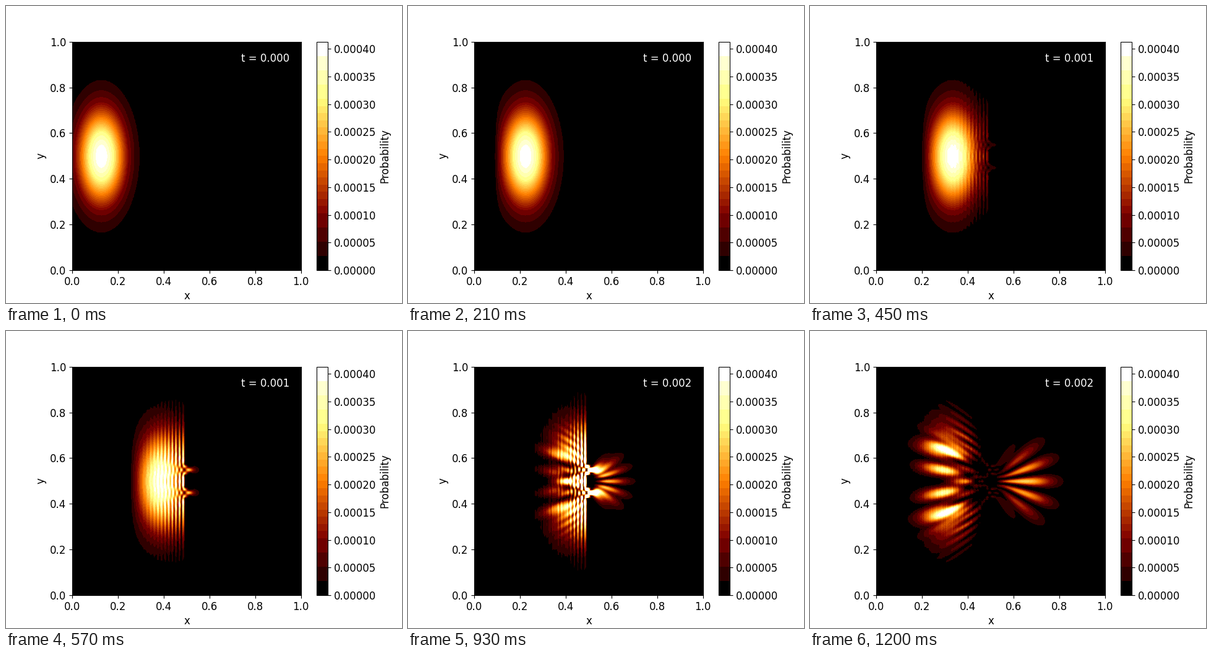
Animation of 640 by 480 pixels, one loop 1230 ms. Source, as a matplotlib script:

```python
import numpy as np
import matplotlib.pyplot as plt
from matplotlib.animation import FuncAnimation
from matplotlib.colors import ListedColormap

# Double-slit Schroedinger equation, Crank-Nicolson on a square grid
N = 200
H = 1 / N
DT = 2.5e-5
STRIDE = 2
FRAMES = 41
INTERVAL = 30
FONT = 12


def open_cells():
    """1 where the wave may be, 0 inside the wall."""
    cells = np.ones((N, N))
    cells[:, 98:103] = 0
    for first in (86, 106):
        cells[first:first + 9, 98:103] = 1
    return cells


def wave_packet():
    x = np.arange(N) * H
    y = x[:, None]
    envelope = np.exp(-((x - 0.125) / 0.1) ** 2 / 2 - ((y - 0.5) / 0.2) ** 2 / 2)
    u = envelope * np.exp(200j * x)
    return u / np.sqrt(np.sum(np.abs(u) ** 2))


CELLS = open_cells()

# With dt / (2 h^2) = 1/2 the half-step operator has spectrum 2 + 2s, |s| <= 1
COEFFS = np.polynomial.chebyshev.chebinterpolate(
    lambda s: (1 - 1j * (2 + 2 * s)) / (1 + 1j * (2 + 2 * s)), 26)


def scaled_operator(u):
    out = np.zeros_like(u)
    out[1:] += u[:-1]
    out[:-1] += u[1:]
    out[:, 1:] += u[:, :-1]
    out[:, :-1] += u[:, 1:]
    return -0.25 * CELLS * out


def step(u):
    """One Crank-Nicolson step as a Chebyshev series."""
    prev, cur = u, scaled_operator(u)
    total = COEFFS[0] * prev + COEFFS[1] * cur
    for c in COEFFS[2:]:
        prev, cur = cur, 2 * scaled_operator(cur) - prev
        total += c * cur
    return total


def simulate():
    u = wave_packet() * CELLS
    states = [np.abs(u) ** 2]
    for _ in range(FRAMES - 1):
        for _ in range(STRIDE):
            u = step(u)
        states.append(np.abs(u) ** 2)
    return states


def banded_heat():
    """Heat colours merged into bands of equal high bits per channel."""
    rgb = np.round(255 * plt.get_cmap("afmhot")(np.arange(256))[:, :3]).astype(int)
    keys = rgb >> np.array([5, 4, 5])
    band = np.r_[0, np.cumsum(np.any(np.diff(keys, axis=0) != 0, axis=1))]
    colors = np.array([rgb[band == b].mean(axis=0) for b in band]) / 255
    colors[band == 0] = 0
    colors[band == band[-1]] = 1
    return ListedColormap(colors)


states = simulate()

fig, ax = plt.subplots(figsize=(6.4, 4.8), dpi=100)
img = ax.imshow(states[0], extent=[0, 1, 0, 1], cmap=banded_heat(),
                vmin=0, vmax=states[0].max())
ax.set_xlabel("x", fontsize=FONT)
ax.set_ylabel("y", fontsize=FONT)
ax.tick_params(labelsize=FONT)

cbar = fig.colorbar(img, ax=ax)
cbar.set_label("Probability", fontsize=FONT)
cbar.ax.tick_params(labelsize=FONT)

clock = ax.text(0.95, 0.95, "", color="white", ha="right", va="top", fontsize=FONT)


def draw(i):
    img.set_data(states[i])
    clock.set_text(f"t = {i * STRIDE * DT:.3f}")
    return img, clock


anim = FuncAnimation(fig, draw, frames=FRAMES, init_func=lambda: draw(0),
                     interval=INTERVAL, repeat=True, repeat_delay=0)
plt.show()
```
